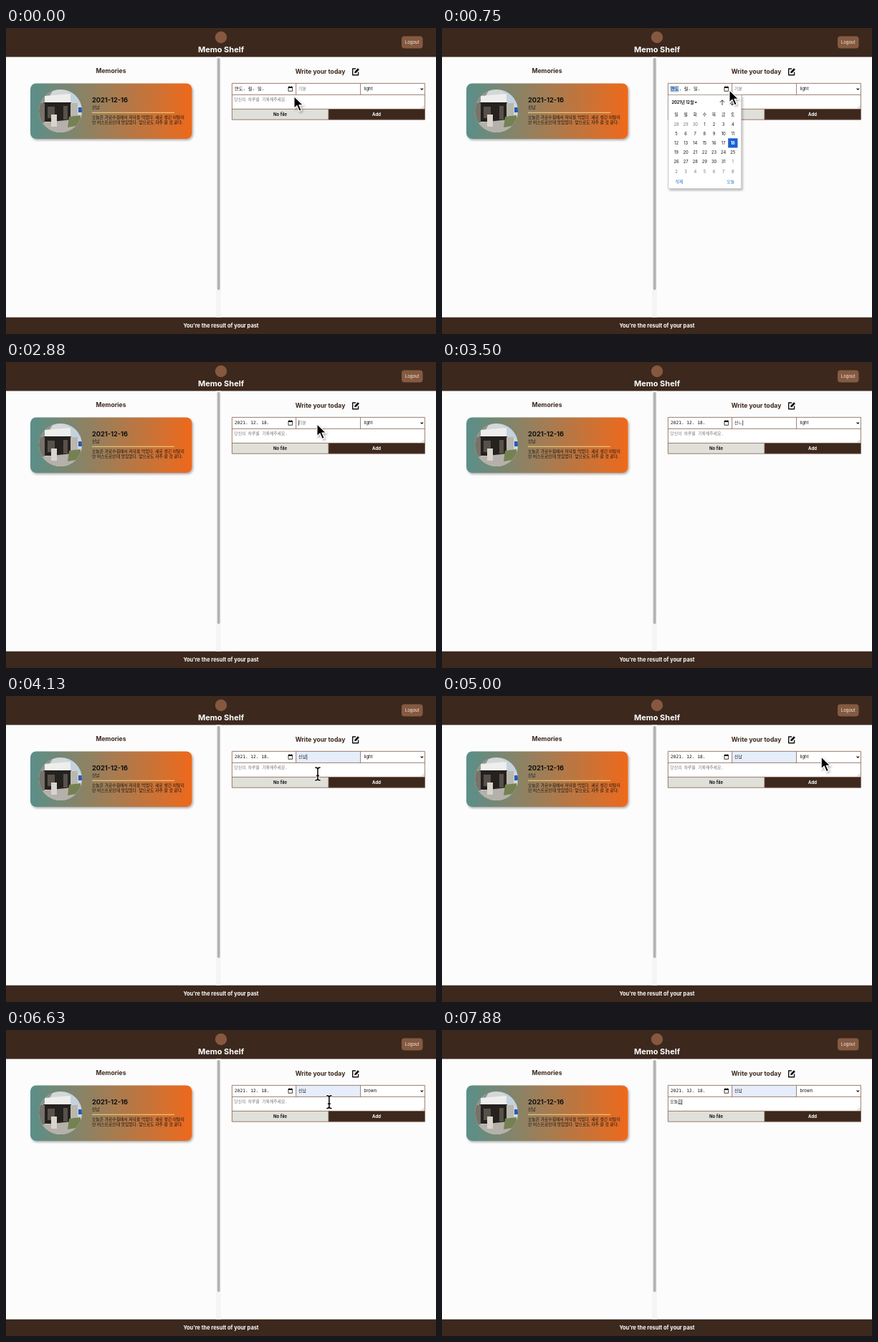
Recreate the animation shown at these times as an HTML page. Size 600 by 428 pixels, loop 8000 ms.

```html
<!DOCTYPE html>
<html lang="ko">
<head>
<meta charset="utf-8">
<title>Memo Shelf</title>
<style>
html, body { margin: 0; width: 100%; height: 100%; overflow: hidden; background: #fcfcfc; }
svg { display: block; width: 600px; height: 428px; }
text { font: 6px Inter, "Noto Sans CJK KR", sans-serif; fill: #111; white-space: pre; }
.mid { text-anchor: middle; }
.bold { font-weight: 700; }
.head { font-size: 8.6px; font-weight: 700; fill: #3c281d; }
.body { font-size: 5.8px; }
.mono { font: 6.2px "DejaVu Sans Mono", "Noto Sans CJK KR", monospace; }
.grey { fill: #757575; }
.white { fill: #fff; }
.link { fill: #1a66d0; }
.line { fill: none; stroke: #111; }
</style>
</head>
<body>
<svg viewBox="0 0 600 428">
  <defs>
    <linearGradient id="warm"><stop offset="0" stop-color="#5a8f89"/><stop offset="1" stop-color="#ee691c"/></linearGradient>
    <clipPath id="round"><circle cx="76" cy="116" r="30"/></clipPath>
    <filter id="soft" x="-20%" y="-20%" width="150%" height="150%">
      <feDropShadow dx="1.5" dy="2" stdDeviation="1.6" flood-opacity=".32"/>
    </filter>
  </defs>

  <rect width="600" height="428" fill="#fcfcfc"/>
  <rect width="600" height="40.5" fill="#3c281d"/>
  <circle cx="300" cy="13" r="8.2" fill="#85583f"/>
  <text class="mid bold white" x="300" y="34" style="font-size:11px">Memo Shelf</text>
  <rect x="552" y="11.5" width="29.5" height="17" rx="4" fill="#855a41"/>
  <text class="mid" x="566.7" y="22.2" style="fill:#f6ece6">Logout</text>
  <rect y="404.7" width="600" height="23.3" fill="#3c281d"/>
  <text class="mid bold white" x="300" y="419" style="font-size:7.45px">You're the result of your past</text>

  <rect x="293" y="40.5" width="7" height="364.2" fill="#f5f5f5"/>
  <rect x="294.8" y="42" width="3.8" height="324.5" rx="1.9" fill="#b2b2b2"/>

  <text class="mid head" x="146.5" y="62.8">Memories</text>
  <rect x="34" y="77.5" width="225.5" height="77.5" rx="8" fill="url(#warm)" filter="url(#soft)"/>
  <g clip-path="url(#round)">
    <rect x="46" y="86" width="60" height="60" fill="#d4d7d8"/>
    <path d="M46 86H66L58 100L46 108Z" fill="#8d938b"/>
    <path d="M84 86H106V108L92 104Z" fill="#c2d3df"/>
    <path d="M54 95L90 92V104H54Z" fill="#eeeeec"/>
    <path d="M52 104H91V131H52Z" fill="#24211f"/>
    <path d="M46 105H54V133H46Z" fill="#77736a"/>
    <path d="M58 110H68V126H58ZM80 109H86V128H80Z" fill="#58514a"/>
    <path d="M46 133L92 128L106 131V146H46Z" fill="#b5b1aa"/>
    <path d="M90 105H100V132H90Z" fill="#b9b7ae"/>
    <path d="M88 124L104 122V136L86 139Z" fill="#758153"/>
    <path d="M63 121H71V138H63Z" fill="#d8d4cb"/>
    <rect x="101" y="111" width="5" height="7" fill="#2859b5"/>
  </g>
  <text class="bold" x="120" y="104" style="font-size:9.2px">2021-12-16</text>
  <text class="body" x="120" y="113">신남</text>
  <path d="M120 118.3H235" stroke="#f3d480"/>
  <text class="body" x="120" y="127">오늘은 가로수길에서 저녁을 먹었다. 새로 생긴 이탈리</text>
  <text class="body" x="120" y="134.3">안 비스트로인데 맛있었다. 앞으로도 자주 갈 것 같다.</text>

  <text class="mid head" x="438.5" y="63.8">Write your today</text>
  <g class="line" stroke-width="1.4" stroke-linejoin="round">
    <path d="M488 57H483.7V65.7H491.6V61.5"/>
    <path d="M486.5 63L487 60.8L491 56.6L492.6 58.2L488.6 62.4Z" fill="#111" stroke-width=".6"/>
  </g>

  <rect x="315.4" y="77.4" width="269" height="36" fill="#fff"/>
  <rect id="moodBg" x="404.8" y="77.4" width="89.8" height="16" fill="#e6eefb"/>
  <rect x="315" y="113.3" width="135" height="15" fill="#dfe0d9"/>
  <rect x="450" y="113.3" width="134.6" height="15" fill="#3c281d"/>
  <path d="M315.4 77.4H584.4V128.2H315.4ZM315.4 93.4H584.4M315.4 113.4H584.4M404.7 77.4V93.4M494.6 77.4V93.4M450 113.4V128.2" fill="none" stroke="#86604e" stroke-width=".8"/>
  <text class="mid bold" x="382.5" y="123">No file</text>
  <text class="mid bold white" x="517" y="123">Add</text>

  <rect id="dateMark" x="318.4" y="81" height="8.6" fill="#a9cbf8"/>
  <text class="mono" id="date" x="319" y="87.4"></text>
  <path d="M394 82.5H399.6V88.3H394ZM395.3 81.2V82.5M398.3 81.2V82.5" class="line" stroke-width=".8"/>
  <path d="M394 82.2H399.6V84H394Z"/>
  <text id="mood" x="408" y="87.4"></text>
  <text id="theme" x="499.5" y="87.4"></text>
  <path d="M578.6 84.5L580.3 86.3L582 84.5" class="line" stroke-width="1.1"/>
  <text class="mono" id="note" x="318.3" y="102.2" style="font-size:5.8px"></text>
  <path d="M579.8 112.5L583.6 108.7M582 112.5L583.6 110.9" stroke="#888" stroke-width=".6"/>
  <path id="caret" class="line" stroke-width=".7"/>
  <path id="compose" class="line" stroke-width=".7"/>

  <g id="calendar">
    <rect x="315.7" y="93.7" width="102" height="131" rx="1" fill="#fff" stroke="#b4b4b4" stroke-width=".7" filter="url(#soft)"/>
    <text class="bold" x="320.5" y="106" style="font-size:5.6px">2021년 12월</text>
    <path d="M352.4 103.2H356L354.2 105.3Z"/>
    <path d="M391 108V100.8M387.8 104L391 100.8L394.2 104M405 100.8V108M401.8 104.8L405 108L408.2 104.8" class="line" stroke-width=".8"/>
    <rect x="399.2" y="154.3" width="13.3" height="13.2" fill="#1a5fd2"/>
    <g id="days"></g>
    <text class="link body" x="325.5" y="217">삭제</text>
    <text class="link body" x="397.3" y="217">오늘</text>
  </g>

  <g id="menu">
    <rect x="490.7" y="78" width="90.3" height="33.6" rx="4" fill="#4b4b4d" stroke="#2d2d2f" stroke-width=".5" filter="url(#soft)"/>
    <rect id="pick" x="492.8" width="85.8" height="10" rx="2" fill="#1f65dc"/>
    <path d="M495.2 85.5L496.8 87.2L499.3 83.2" class="line" style="stroke:#fff" stroke-width=".9"/>
    <text class="white" x="502" y="87.4">light</text>
    <text class="white" x="502" y="97.2">brown</text>
    <text class="white" x="502" y="107">colorful</text>
  </g>

  <g id="arrow" filter="url(#soft)">
    <path d="M0 0V17L4 13.3L7.2 20.8L10.2 19.5L7 12.2H12.4Z" stroke="#fff" stroke-width="1.1"/>
  </g>
  <g id="beam" fill="none">
    <path id="beamShape" d="M-3.6 -9Q0 -9 0 -6.5Q0 -9 3.6 -9M0 -6.5V6.5M-3.6 9Q0 9 0 6.5Q0 9 3.6 9M-2 2.5H2" stroke="#fff" stroke-width="3"/>
    <use href="#beamShape"/>
    <path d="M-3.6 -9Q0 -9 0 -6.5Q0 -9 3.6 -9M0 -6.5V6.5M-3.6 9Q0 9 0 6.5Q0 9 3.6 9M-2 2.5H2" stroke="#000" stroke-width="1.5"/>
  </g>
</svg>
<script>
const LOOP = 8000, STEP = 125;
const $ = id => document.getElementById(id);
const show = (id, on) => $(id).setAttribute('display', on ? 'inline' : 'none');
const put = (id, str, grey) => {
  $(id).textContent = str;
  $(id).classList.toggle('grey', grey);
};

// Calendar grid: December starts on a Wednesday.
const cell = (str, col, y, cls) =>
  `<text class="mid body ${cls}" x="${327 + 13.13 * col}" y="${y}">${str}</text>`;
let days = [...'일월화수목금토'].map((d, i) => cell(d, i, 123, '')).join('');
for (let i = 0; i < 42; i++) {
  const n = i - 2;
  const day = n < 1 ? n + 30 : n > 31 ? n - 31 : n;
  const cls = n === 18 ? 'white bold' : n === day ? '' : 'grey';
  days += cell(day, i % 7, 137 + 13.1 * Math.floor(i / 7), cls);
}
$('days').innerHTML = days;

// Pointer path: time, x, y
const path = [
  [0, 402, 95.5], [125, 402, 95.5], [500, 401, 87], [875, 401, 87],
  [1375, 408, 158], [1875, 411, 158.5], [2000, 411, 158.5], [2625, 434, 86.5],
  [3625, 434, 88], [4000, 435, 109], [4250, 435, 109], [4875, 530, 85],
  [5250, 527, 85], [5625, 525, 97], [6125, 525, 97], [6875, 425, 102], [LOOP, 425, 102]
];
function pointer(t) {
  const i = path.findIndex(p => p[0] > t);
  const [t0, x0, y0] = path[i - 1], [t1, x1, y1] = path[i];
  const u = (t - t0) / (t1 - t0), e = u * u * (3 - 2 * u);
  return [x0 + (x1 - x0) * e, y0 + (y1 - y0) * e];
}

const typed = (keys, start, gap, t) =>
  t < start ? '' : keys[Math.min(keys.length - 1, Math.floor((t - start) / gap))];
const moodKeys = ['ㅅ', '시', '신', '신ㄴ', '신나', '신남'];
const noteKeys = ['ㅇ', '오', '온', '오느', '오늘', '오늘ㅇ', '오늘으', '오늘은'];

function draw(t) {
  const open = t >= 500 && t < 1500, dated = t >= 1500;
  const menuOpen = t >= 5125 && t < 6125;
  show('calendar', open);
  show('dateMark', t >= 500 && t < 2625);
  $('dateMark').setAttribute('width', dated ? 16 : 12);
  put('date', dated ? '2021. 12. 18.' : '연도. 월. 일.', false);

  const mood = typed(moodKeys, 3125, 125, t);
  put('mood', mood || '기분', !mood);
  show('moodBg', t >= 3875);
  put('theme', t < 6125 ? 'light' : 'brown', false);
  const note = typed(noteKeys, 7000, 125, t);
  put('note', note || '당신의 하루를 기록해주세요.', !note);

  const inMood = t >= 2750 && t < 5000, inNote = t >= 6875;
  const caretX = inNote ? 318.5 + note.length * 5.4 : 408.5 + mood.length * 5.6;
  show('caret', inMood || inNote);
  $('caret').setAttribute('d', `M${caretX} ${inNote ? 97 : 81.5}v7.5`);
  show('compose', note);
  $('compose').setAttribute('d', `M${caretX - 5.3} 103.3h5.3`);

  const [x, y] = pointer(t);
  show('menu', menuOpen);
  $('pick').setAttribute('y', y < 90 ? 80.5 : 90.2);

  const hidden = t >= 3125 && t < 3625 || t >= 7000;
  const beam = t >= 3625 && t < 4500 || t >= 6625;
  show('arrow', !hidden && !beam);
  show('beam', !hidden && beam);
  for (const id of ['arrow', 'beam']) $(id).setAttribute('transform', `translate(${x} ${y})`);
}

const begin = performance.now();
function tick() {
  const t = (performance.now() - begin) % LOOP;
  draw(Math.floor(t / STEP) * STEP);
  requestAnimationFrame(tick);
}
tick();
</script>
</body>
</html>
```
